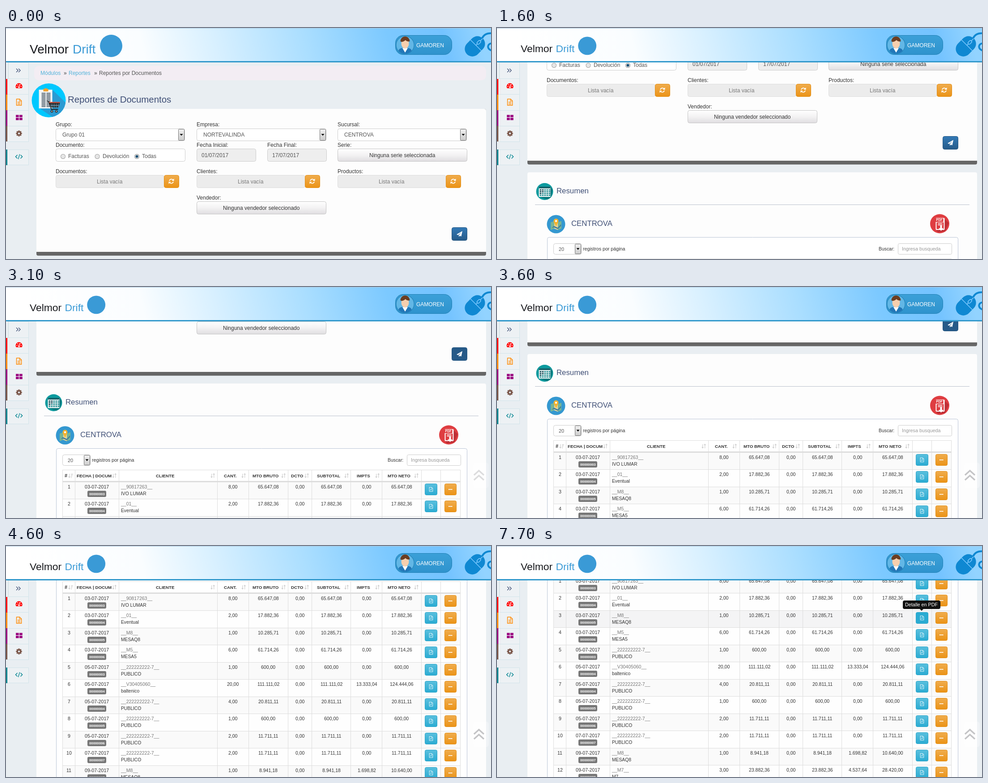
Animation of 1084 by 517 pixels, one loop 8000 ms. Source, as an HTML page with a canvas:

```html
<!DOCTYPE html>
<html lang="es">
<head>
<meta charset="utf-8">
<title>Reportes de Documentos</title>
<style>
html, body { margin: 0; width: 100%; height: 100%; overflow: hidden; }
canvas { display: block; width: 1084px; height: 517px; }
</style>
</head>
<body>
<canvas id="stage" width="1084" height="517"></canvas>
<script>
const c = document.getElementById('stage').getContext('2d');
const LOOP = 8000, ROW_TOP = 747, ROW_H = 38.45;
const INK = '#333', NAVY = '#3f4f76', LINE = '#ddd';
const BLUE = ['#337ab7', '#265a88'], CYAN = ['#5bc0de', '#2aabd2'], ORANGE = ['#f0ad4e', '#eb9316'];

// Scroll positions, one per 100 ms from each start time
const SCROLLS = [
  [1200, [8, 45, 110, 175, 204]],
  [2700, [211, 230, 256, 284, 311, 336, 353, 361]],
  [3600, [377, 403, 433, 453, 461]],
  [4200, [477, 510, 554, 600, 641, 669, 680]]
];

const ROWS = [
  '03|3|90817263|IVO LUMAR|8,00|65.647,08',
  '03|4|01|Eventual|2,00|17.882,36',
  '03|5|M8|MESAQ8|1,00|10.285,71',
  '03|6|M5|MESA5|6,00|61.714,26',
  '05|3|222222222-7|PUBLICO|1,00|600,00',
  '05|4|V30405060|baltenico|20,00|111.111,02|13.333,04|124.444,06',
  '05|4|222222222-7|PUBLICO|4,00|20.811,11',
  '05|5|222222222-7|PUBLICO|1,00|600,00',
  '05|6|222222222-7|PUBLICO|2,00|11.711,11',
  '07|7|222222222-7|PUBLICO|2,00|11.711,11',
  '09|7|M8|MESAQ8|1,00|8.941,18|1.698,82|10.640,00',
  '09|8|M7|M7|3,00|23.882,36|4.537,64|28.420,00'
].map(r => r.split('|'));

const COLS = [126, 154, 252, 472, 542, 630, 683, 770, 840, 928, 971, 1015];
const HEADS = [['#', 134, 144], ['FECHA | DOCUM', 197, 242], ['CLIENTE', 355.5, 462], ['CANT.', 501.5, 531],
  ['MTO BRUTO', 580.5, 620], ['DCTO', 650.5, 672], ['SUBTOTAL', 721, 761], ['IMPTS', 799, 830], ['MTO NETO', 878, 917]];

const clamp = v => Math.max(0, Math.min(1, v));

// Text starts on whole pixels so that it stays crisp
function text(str, x, y, size = 12, color = INK, align = 'left', weight = '') {
  c.font = `${weight} ${size}px "Liberation Sans", Arial, sans-serif`;
  c.fillStyle = color;
  if (align === 'center') x -= c.measureText(str).width / 2;
  c.fillText(str, Math.round(x), Math.round(y));
}
function rect(x, y, w, h, color) {
  c.fillStyle = color;
  c.fillRect(x, y, w, h);
}
function box(x, y, w, h, r, fill, border) {
  c.beginPath();
  if (border) c.roundRect(x + .5, y + .5, w - 1, h - 1, r);
  else c.roundRect(x, y, w, h, r);
  if (fill) { c.fillStyle = fill; c.fill(); }
  if (border) { c.strokeStyle = border; c.lineWidth = 1; c.stroke(); }
}
function shade(y, h, colors) {
  const g = c.createLinearGradient(0, y, 0, y + h);
  colors.forEach((k, i) => g.addColorStop(i / (colors.length - 1), k));
  return g;
}
function disc(x, y, r, color) {
  c.beginPath();
  c.arc(x, y, r, 0, 7);
  c.fillStyle = color;
  c.fill();
}
function poly(points, color) {
  c.beginPath();
  points.forEach(p => c.lineTo(...p));
  c.fillStyle = color;
  c.fill();
}
function stroke(points, color, width = 1) {
  c.beginPath();
  points.forEach(p => c.lineTo(...p));
  c.strokeStyle = color;
  c.lineWidth = width;
  c.stroke();
}
function at(x, y, draw, scale = 1) {
  c.save();
  c.translate(x, y);
  c.scale(scale, scale);
  draw();
  c.restore();
}

function select(x, y, w, h, label, size, pad) {
  box(x, y, w, h, 4, '#fff', '#ccc');
  text(label, x + pad, y + h / 2 + 4, size, '#555');
  box(x + w - 15, y + 1, 14, h - 2, 1, shade(y, h, ['#f4f4f4', '#ddd', '#ccc']), '#777');
  const ax = x + w - 8, ay = y + h / 2;
  poly([[ax - 3.5, ay - 2], [ax + 3.5, ay - 2], [ax, ay + 2]], '#000');
}
function wideButton(x, y, label) {
  box(x, y, 290, 29, 4, shade(y, 29, ['#fff', '#f3f2f3', '#dfdde0']), '#c4c4c4');
  text(label, x + 145, y + 19, 12, INK, 'center');
}
function refreshIcon() {
  for (const a of [0, Math.PI]) {
    c.save();
    c.rotate(a);
    c.beginPath();
    c.arc(0, 0, 4.6, Math.PI * 1.06, Math.PI * 1.8);
    c.strokeStyle = '#fff';
    c.lineWidth = 1.8;
    c.stroke();
    poly([[6, -6], [6, -1], [1, -1]], '#fff');
    c.restore();
  }
}
function listField(x, label) {
  text(label, x, 325);
  box(x, 329, 243, 29, 4, '#ececec', '#ddd');
  text('Lista vacía', x + 121, 348, 12, '#777', 'center');
  box(x + 242, 329, 34, 29, 4, shade(329, 29, ORANGE), '#e38d13');
  at(x + 258.5, 343, refreshIcon);
}
function dateField(x, label, value) {
  text(label, x, 266);
  box(x, 270, 133, 29, 4, '#eee', '#ccc');
  text(value, x + 11, 289, 12, '#555');
}
function radio(x, label, tx, on) {
  disc(x, 287.5, 5.5, '#9a9a9a');
  disc(x, 287.5, 4.6, '#e6e6e6');
  if (on) disc(x, 287.5, 3, '#1b4f74');
  text(label, tx, 291, 12, '#555');
}

function reportIcon() {
  disc(0, 0, 38, '#00c8ff');
  c.save();
  c.beginPath();
  c.arc(0, 0, 38, 0, 7);
  c.clip();
  poly([[9, -23], [45, 12], [20, 45], [-20, 18]], '#2b9bd3');
  c.restore();
  rect(-22, -24, 30, 42, '#f4f6f7');
  rect(-12, -26, 11, 6, '#f0a030');
  disc(-6.5, -25, 2.5, '#f0a030');
  for (let y = -17; y < 15; y += 3) for (const x of [-16, -5]) rect(x, y, 9, 1.6, '#3d4c5c');
  poly([[1, 5], [25, 5], [22, 16], [5, 16]], '#222');
  stroke([[-4, 1], [0, 3], [6, 20], [21, 20]], '#222', 1.8);
  rect(1, 3.5, 24, 2, '#e7553c');
  for (let x = 5; x < 23; x += 4) rect(x, 7, 1, 9, '#7fb9d6');
  rect(4, 11, 19, 1, '#7fb9d6');
  for (const x of [7, 17]) { disc(x, 24.5, 2.8, '#222'); disc(x, 24.5, 1.3, '#ddd'); }
}

function form(t) {
  box(63, 85, 1010, 32, 10, '#f3edf3');
  text('Módulos', 77, 105, 12, '#53b3da');
  text('»', 129, 105, 12, '#444');
  text('Reportes', 140, 105, 12, '#53b3da');
  text('»', 197, 105, 12, '#444');
  text('Reportes por Documentos', 208, 105, 12, '#555');

  box(68, 181, 1005, 328.5, 4, '#666');
  box(68, 181, 1005, 320, [4, 4, 0, 0], '#fdfdfd');
  at(95.5, 162, reportIcon);
  text('Reportes de Documentos', 138, 167, 20.4, NAVY);

  [[111, 'Grupo:', 'Grupo 01'], [426, 'Empresa:', 'NORTEVALINDA'], [741, 'Sucursal:', 'CENTROVA']].forEach(([x, label, value]) => {
    text(label, x, 220);
    select(x, 225, x === 426 ? 290 : 289, 28, value, 12, 15);
  });

  text('Documento:', 111, 266);
  box(111, 270, 290, 29, 4, '#fff', '#ccc');
  radio(127.5, 'Facturas', 139);
  radio(204, 'Devolución', 216);
  radio(292.5, 'Todas', 304);
  radio(292.5, '', 304, true);
  dateField(426, 'Fecha Inicial:', '01/07/2017');
  dateField(584, 'Fecha Final:', '17/07/2017');
  text('Serie:', 741, 266);
  wideButton(741, 270, 'Ninguna serie seleccionada');

  listField(111, 'Documentos:');
  listField(426, 'Clientes:');
  listField(741, 'Productos:');
  text('Vendedor:', 426, 384);
  wideButton(426, 388, 'Ninguna vendedor seleccionado');

  const pressed = t >= 2100 && t < 2300;
  const fill = pressed ? '#204d74' : t >= 1800 ? '#265a88' : shade(446, 30, BLUE);
  box(996, 446, 35, 30, 4, fill, '#245580');
  at(1013.5, 461, () => {
    poly([[6.5, -6.5], [4, 5.5], [.5, 4], [-1.5, 6.5], [-1.5, 3], [4, -3.5], [-3, 2.5], [-6.5, 1]], '#fff');
  });
}

function calendarIcon() {
  disc(0, 0, 19, '#0c9a9e');
  poly([[12, -11], [18, -4], [14, 13], [6, 18], [-12, 12]], '#08797d');
  rect(-13, -11, 26, 23, '#f2f8f8');
  rect(-13, -11, 26, 4, '#17646b');
  for (let y = -5; y < 11; y += 4) for (let x = -11; x < 11; x += 5) rect(x, y, 3.6, 2.8, x + y < -6 ? '#1d4e59' : '#2f9296');
}
function mapIcon() {
  disc(0, 0, 20.5, '#3498d0');
  poly([[-12, -4], [-4, -7], [4, -4], [12, -7], [12, 10], [4, 13], [-4, 10], [-12, 13]], '#78b596');
  poly([[-4, -7], [4, -4], [4, 13], [-4, 10]], '#e7d59a');
  poly([[-10, 9], [-5, 4], [4, 8], [11, 0], [11, 4], [4, 11], [-5, 7]], '#3d7c9f');
  poly([[-5, -5], [5, -5], [0, 5]], '#f5b32f');
  disc(0, -7, 5.5, '#f5b32f');
  disc(0, -7, 2.2, '#fff');
}
function downloadIcon() {
  disc(0, 0, 21.5, '#df3d41');
  poly([[9, -12], [20, -2], [12, 17], [-4, 19], [-8, 14]], '#bd2f36');
  box(-9, -13, 20, 27, 2, '#fff');
  box(-7, -3, 16, 15, 1, '#df3d41');
  rect(-10, -12, 18, 8, '#df3d41');
  text('PDF', -1, -6, 7, '#fff', 'center', 'bold');
  rect(-4, -1, 10, 1.5, '#fff');
  rect(-4, 2, 10, 1.5, '#fff');
  poly([[1, 4], [5, 4], [5, 10], [8.5, 10], [3, 16], [-2.5, 10], [1, 10]], '#fff');
}
function sortIcon(x, y, first) {
  c.globalAlpha = .85;
  rect(x - 3, y - 4, 1.3, 9, '#ccc');
  poly([[x - 5, y + 2], [x + .3, y + 2], [x - 2.4, y + 5.5]], '#ccc');
  if (first) for (let i = 0; i < 4; i++) rect(x + 1, y - 4 + i * 2.6, 5 - i, 1.4, '#ccc');
  else {
    rect(x + 2, y - 4, 1.3, 9, '#ccc');
    poly([[x, y - 2], [x + 5.3, y - 2], [x + 2.6, y - 5.5]], '#ccc');
  }
  c.globalAlpha = 1;
}
function docIcon() {
  c.lineJoin = 'round';
  stroke([[-4.5, -5.5], [2, -5.5], [4.5, -3], [4.5, 5.5], [-4.5, 5.5], [-4.5, -6]], '#fff');
  stroke([[1.5, -5], [1.5, -2.5], [4, -2.5]], '#fff');
  stroke([[-2.5, 3], [0, -1], [2.5, 2.5]], '#fff');
}

function row(r, i, hover) {
  const [day, doc, id, name, qty, gross, tax = '0,00', net = gross] = r;
  const y = Math.round(ROW_TOP + i * ROW_H), b = y + 15;
  rect(126, y, 890, 39, hover.row === i ? '#f4f4f5' : i % 2 ? '#fefefe' : '#fafafa');
  rect(126, y, 890, 1, LINE);
  text(i + 1, 140.5, b, 10.6, INK, 'center');
  text(`${day}-07-2017`, 203, b, 10.6, INK, 'center');
  box(182, y + 20, 42, 14, 3, '#777');
  text(doc.padStart(8, '0'), 203, y + 30, 7.8, '#fff', 'center', 'bold');
  text(`__${id}__`, 257, b, 10.5, '#777');
  text(name, 257, y + 30, 10.3);
  [[qty, 507], [gross, 586.5], ['0,00', 657], [gross, 727.5], [tax, 806], [net, 884.5]]
    .forEach(([v, x]) => text(v, x, b, 10.5, INK, 'center'));
  const active = hover.row === i ? hover.button : '';
  box(936, y + 4, 28, 26, 3, active === 'doc' ? '#2aabd2' : shade(y + 4, 26, CYAN), '#28a4c9');
  at(950, y + 17, docIcon, .85);
  box(980, y + 4, 27, 26, 3, active === 'more' ? '#eb9316' : shade(y + 4, 26, ORANGE), '#e38d13');
  for (const x of [989, 992, 995]) rect(x, y + 16, 2.4, 2, '#fff');
}

function summary(hover) {
  box(68, 527, 1005, 800, 4, '#fdfdfd');
  at(106.5, 570, calendarIcon);
  text('Resumen', 132.5, 574, 16.8, NAVY);
  rect(85, 599, 971, 1, '#b9c0cc');
  at(132, 643, mapIcon);
  text('CENTROVA', 165.5, 647, 16.8, NAVY);
  at(989.5, 642, downloadIcon);
  box(112, 672, 919, 700, 4, '#fff', '#b9c4d6');

  select(126, 686, 63, 25, '20', 10.8, 12);
  text('registros por página', 192, 702, 10.7);
  text('Buscar:', 853, 702, 10.4);
  box(896, 686, 121, 25, 3, '#fff', '#ccc');
  text('Ingresa busqueda', 905, 702, 10.8, '#999');

  rect(126, 720, 890, 1, LINE);
  HEADS.forEach(([label, x, sx], i) => {
    text(label, x, 737, i ? 9.7 : 11, INK, 'center', 'bold');
    sortIcon(sx, 733, !i);
  });
  ROWS.forEach((r, i) => row(r, i, hover));
  rect(126, 745, 890, 2, LINE);
  COLS.forEach(x => rect(x, 720, 1, 600, LINE));
}

function tooltip(label, x, w, alpha) {
  if (alpha <= 0) return;
  c.globalAlpha = alpha;
  box(x - w / 2, 122, w, 19, 4, '#111');
  poly([[x - 4, 141], [x + 4, 141], [x, 145]], '#111');
  text(label, x, 135, 10.8, '#fff', 'center');
  c.globalAlpha = 1;
}

function sidebar() {
  rect(3, 77, 48, 178, '#edf1f4');
  rect(3, 272, 48, 35, '#edf1f4');
  ['#f00', '#ff8a00', '#99007f', '#795548'].forEach((k, i) => rect(0, 114 + i * 35, 3, 35, k));
  rect(0, 272, 3, 35, '#00838f');
  for (const y of [77, 113, 148, 184, 219, 254, 272, 306]) rect(3, y, 48, 1, '#d2e4ea');
  rect(50, 77, 1, 178, '#d2e4ea');
  rect(50, 272, 1, 35, '#d2e4ea');
  rect(5, 77, 1, 36, '#c6d8de');
  for (const x of [23, 28]) stroke([[x, 91], [x + 4, 95], [x, 99]], NAVY, 1.4);

  c.beginPath();
  c.arc(29, 131, 7.5, Math.PI * .83, Math.PI * .17);
  c.closePath();
  c.fillStyle = '#f00';
  c.fill();
  for (const [x, y] of [[24.5, 131], [26, 127], [32, 127], [33.5, 131]]) disc(x, y, 1.1, '#fff');
  stroke([[29, 132], [30, 126]], '#fff', 1.4);
  disc(29, 132.5, 1.8, '#fff');

  stroke([[23.5, 159], [30.5, 159], [34.5, 163], [34.5, 173], [23.5, 173], [23.5, 158.5]], '#ff8a00', 1.5);
  stroke([[30, 159], [30, 163.5], [34, 163.5]], '#ff8a00', 1.2);
  for (const y of [165.5, 168, 170.5]) rect(26, y - .5, 6, 1.2, '#ff8a00');

  for (const x of [22, 30]) for (const y of [194.5, 201]) rect(x, y, 6.7, 5.2, '#99007f');

  for (let i = 0; i < 8; i++) {
    c.save();
    c.translate(29, 236);
    c.rotate(i * Math.PI / 4);
    rect(-1.5, -6.7, 3, 4, '#795548');
    c.restore();
  }
  disc(29, 236, 5, '#795548');
  disc(29, 236, 2.1, '#edf1f4');

  stroke([[25.5, 284], [21.5, 288], [25.5, 292]], '#00838f', 1.5);
  stroke([[32.5, 284], [36.5, 288], [32.5, 292]], '#00838f', 1.5);
  stroke([[30.5, 282.5], [27.5, 293.5]], '#00838f', 1.3);
}

function header(shrink) {
  const g = c.createLinearGradient(60, 140, 1030, -100);
  [[0, '#fff'], [.26, '#fafdff'], [.42, '#d8f0ff'], [.62, '#aadeff'], [.8, '#7cc9ff'], [.92, '#74c3ff'], [1, '#92d3ff']]
    .forEach(s => g.addColorStop(...s));
  rect(0, 0, 1084, 77, g);
  rect(0, 0, 1084, 1, '#a9c8df');
  rect(0, 74, 1084, 3, '#3399cc');

  at(53, 39, () => {
    text('Velmor', 0, 18, 28, '#16181c');
    text('Drift', 96, 18, 28, '#3a9ad6');
    disc(182, 1, 25, '#3a9ad6');
  }, 1 - .183 * shrink);

  box(870, 16, 127, 44, 17, shade(16, 44, ['#3ba0d8', '#2f93cd']), '#1f7fb5');
  disc(892, 38, 20.5, '#1f7fb5');
  disc(892, 38, 19.5, '#62b7e6');
  c.save();
  c.beginPath();
  c.arc(892, 38, 19.5, 0, 7);
  c.clip();
  box(877, 45, 30, 20, 8, '#2277b8');
  poly([[886, 45], [898, 45], [892, 55]], '#fff');
  c.restore();
  c.beginPath();
  c.ellipse(892, 35, 8.5, 11, 0, 0, 7);
  c.fillStyle = '#f6cfae';
  c.fill();
  c.beginPath();
  c.ellipse(892, 30, 10.5, 11, 0, Math.PI, 0);
  c.quadraticCurveTo(896, 31, 893, 27);
  c.quadraticCurveTo(886, 33, 881.5, 30);
  c.fillStyle = '#6b3d22';
  c.fill();
  text('GAMOREN', 917, 43, 12, '#fff');

  c.save();
  c.translate(1048, 41);
  c.rotate(Math.PI / 4);
  box(-17, -25, 34, 50, 17, '#0f88d2');
  rect(-17, -4, 34, 1.5, '#7fcaff');
  rect(-.75, -25, 1.5, 22, '#7fcaff');
  box(-3.5, -18, 7, 11, 3.5, '#7fcaff');
  box(-2, -16.5, 4, 8, 2, '#0f88d2');
  c.restore();
  c.beginPath();
  c.moveTo(1064, 23);
  c.bezierCurveTo(1068, 15, 1076, 11, 1086, 12);
  c.moveTo(1086, 34);
  c.bezierCurveTo(1075, 36, 1074, 46, 1086, 51);
  c.strokeStyle = '#0f88d2';
  c.lineWidth = 4;
  c.stroke();
}

function toTop(alpha) {
  if (alpha <= 0) return;
  c.globalAlpha = alpha;
  box(1044, 393, 35, 57, 6, 'rgba(255,255,255,.3)');
  for (const y of [411, 422]) stroke([[1046, y + 10], [1057, y], [1068, y + 10]], '#c4c4c6', 3.5);
  c.globalAlpha = 1;
}

function scrollAt(t) {
  let pos = 0;
  for (const [start, steps] of SCROLLS) {
    if (t >= start) pos = steps[Math.min(steps.length - 1, Math.floor((t - start) / 100))];
  }
  return pos;
}

function draw(now) {
  const t = Math.floor(now % LOOP / 100) * 100;
  const hover = { row: t >= 4800 ? 2 : -1, button: t < 5700 ? '' : t < 5800 || t >= 6800 ? 'doc' : 'more' };

  rect(0, 0, 1084, 517, '#e9eef2');
  at(0, -scrollAt(t), () => {
    form(t);
    summary(hover);
  });
  at(0, t === 1200 ? -8 : 0, sidebar);
  toTop(clamp((t - 2800) / 500));
  tooltip('Ver detalle', 993.5, 63, .9 * Math.min(clamp((t - 5900) / 300), clamp((7100 - t) / 400)));
  tooltip('Detalle en PDF', 949, 84, clamp((t - 7100) / 300));
  header(clamp((t - 1200) / 400));
  requestAnimationFrame(draw);
}
requestAnimationFrame(draw);
</script>
</body>
</html>
```
